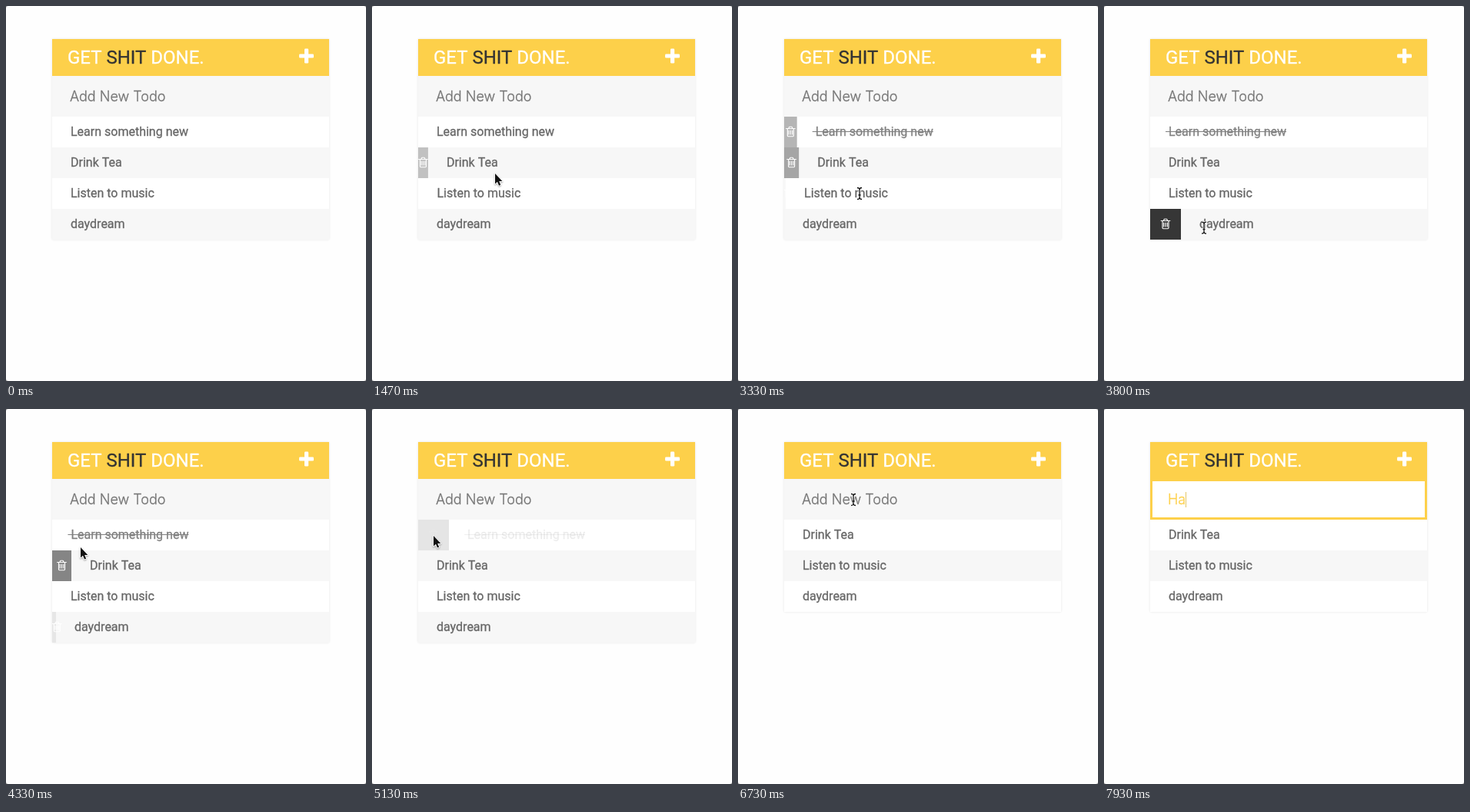
These frames come from a looping animation (468x488 px, 8000 ms). An HTML page with a canvas:

```html
<!DOCTYPE html>
<html lang="en">
<head>
<meta charset="utf-8">
<title>Todo list</title>
<style>
html, body { margin: 0; width: 100%; height: 100%; overflow: hidden; background: #fefefe; }
canvas { display: block; width: 468px; height: 488px; }
</style>
</head>
<body>
<canvas id="stage" width="468" height="488"></canvas>
<script>
const ctx = document.getElementById('stage').getContext('2d');
const FRAMES = 120, STEP = 200 / 3, SUBSTEPS = 32;
const LEFT = 60, WIDTH = 360, TOP = 43, INPUT_Y = 91, LIST_Y = 144, ROW = 40;
const BOX = 40, BOX_TIME = 200, ICON = 12.57;
const YELLOW = '#fdd04a', GRAY = '#f7f7f7', WHITE = '#fefefe';
const ITEM_FONT = '16px Roboto, sans-serif';
const TITLE_FONT = '24px Roboto, sans-serif';
const INPUT_FONT = '300 18px Inter, sans-serif';

const STRIKE = 2730, FADE = 4750, REMOVE = 5260, FOCUS = 6860;
const KEYS = [7460, 7660];
const items = ['Learn something new', 'Drink Tea', 'Listen to music', 'daydream'];

// Pointer stops as [time, x, y].
const path = [
  [60, 460, 438], [870, 190, 336], [1265, 165, 304], [1402, 162, 224], [1467, 160, 218],
  [1780, 160, 184], [1950, 163, 170], [3100, 163, 170], [3215, 161, 184], [3322, 158, 224],
  [3333, 158, 244], [3600, 150, 264], [3900, 120, 301], [4158, 102, 264], [4203, 100, 224],
  [4330, 97, 184], [4333, 97, 180], [4600, 80, 165], [5300, 80, 165], [5680, 92, 184],
  [5780, 102, 224], [5933, 107, 237], [6100, 108, 230], [6270, 135, 144], [6650, 150, 118]
];

const trash = new Path2D('M192 448H1600M448 448V1460Q448 1600 544 1600H1248Q1344 1600 1344 1460V448' +
  'M610 448L680 240Q700 192 740 192H1052Q1092 192 1112 240L1182 448' +
  'M640 704V1344M896 704V1344M1152 704V1344');
const arrow = new Path2D('M0 0V13.5L3 10.8L5 15.6L7.2 14.7L5.2 10H9.4Z');
const beam = new Path2D('M-3 -7.5Q0 -7.5 0 -5Q0 -7.5 3 -7.5M0 -5V5M-3 7.5Q0 7.5 0 5Q0 7.5 3 7.5M-1.5 2H1.5');

const clamp = (v, low, high) => Math.min(high, Math.max(low, v));
const listAt = t => t < REMOVE ? items : items.slice(1);

function pointerAt(t) {
  const k = path.findIndex(p => p[0] > t);
  if (k < 1) return path.at(k).slice(1);
  const [t0, x0, y0] = path[k - 1], [t1, x1, y1] = path[k];
  const p = (t - t0) / (t1 - t0);
  return [x0 + (x1 - x0) * p, y0 + (y1 - y0) * p];
}

// Delete boxes open under the pointer and close again at constant speed.
function simulateBoxes() {
  const widths = Object.fromEntries(items.map(item => [item, 0]));
  const frames = [], dt = STEP / SUBSTEPS;
  for (let n = 0; n < FRAMES * SUBSTEPS; n++) {
    if (n % SUBSTEPS === 0) frames.push({ ...widths });
    const [x, y] = pointerAt(n * dt);
    const inside = x >= LEFT && x < LEFT + WIDTH;
    listAt(n * dt).forEach((item, i) => {
      const hover = inside && Math.floor((y - LIST_Y) / ROW) === i;
      widths[item] = clamp(widths[item] + (hover ? 1 : -1) * dt * BOX / BOX_TIME, 0, BOX);
    });
  }
  return frames;
}

function rect(x, y, w, h, color) {
  ctx.fillStyle = color;
  ctx.fillRect(x, y, w, h);
}

function roundRect(x, y, w, h, r, color) {
  ctx.fillStyle = color;
  ctx.beginPath();
  ctx.roundRect(x, y, w, h, r);
  ctx.fill();
}

// A hairline stroke gives the text its slightly heavy smoothing.
function write(text, x, y, font, color) {
  ctx.font = font;
  ctx.fillStyle = ctx.strokeStyle = color;
  ctx.lineWidth = 0.3;
  ctx.lineJoin = 'round';
  ctx.fillText(text, x, y);
  ctx.strokeText(text, x, y);
  return x + ctx.measureText(text).width;
}

function drawHeader() {
  rect(LEFT, TOP, WIDTH, INPUT_Y - TOP, YELLOW);
  let x = write('GET ', 80, 75, TITLE_FONT, '#fff');
  x = write('SHIT', x, 75, TITLE_FONT, '#333');
  write(' DONE.', x, 75, TITLE_FONT, '#fff');
  roundRect(381.1, 62.4, 18.9, 5.2, 1.3, '#fff');
  roundRect(388, 55.6, 5.2, 18.9, 1.3, '#fff');
}

function drawInput(t) {
  const focused = t >= FOCUS;
  rect(LEFT, INPUT_Y, WIDTH, LIST_Y - INPUT_Y, focused ? YELLOW : GRAY);
  if (focused) rect(LEFT + 3, INPUT_Y + 3, WIDTH - 6, 47, '#fff');
  const typed = 'Ha'.slice(0, KEYS.filter(k => t >= k).length);
  let end = 83;
  if (typed) end = write(typed, 83, 124, INPUT_FONT, YELLOW);
  else write('Add New Todo', 83, 124, INPUT_FONT, '#757575');
  const last = [FOCUS, ...KEYS].filter(k => t >= k).pop();
  if (focused && (t - last) % 1000 < 500) rect(Math.round(end), 108, 1, 20, '#e6c666');
}

function drawBox(y, w) {
  ctx.save();
  const alpha = ctx.globalAlpha;
  ctx.globalAlpha = alpha * (w / BOX) ** 1.15;
  rect(LEFT, y, w, ROW, '#363636');
  ctx.globalAlpha = alpha;
  ctx.translate(LEFT + Math.max(0, (w - ICON) / 2), y + 19.5);
  ctx.scale(1 / 112, 1 / 112);
  ctx.translate(-192, -896);
  ctx.strokeStyle = '#fff';
  ctx.lineWidth = 128;
  ctx.stroke(trash);
  ctx.restore();
}

function drawRow(item, i, w, t) {
  const y = LIST_Y + i * ROW;
  const first = item === items[0], struck = first && t >= STRIKE;
  rect(LEFT, y, WIDTH, ROW, i % 2 ? GRAY : '#fff');
  ctx.save();
  if (first) {
    const p = clamp((t - FADE) / 500, 0, 1);
    ctx.globalAlpha = 0.5 + Math.cos(p * Math.PI) / 2;
  }
  if (w > 0) drawBox(y, w);
  const start = 84 + w;
  const end = write(item, start, y + 25, ITEM_FONT, struck ? '#808080' : '#666');
  if (struck) rect(start - 4, y + 19, end - start + 4, 1, '#808080');
  ctx.restore();
  return { y, start, end };
}

function drawPointer(t, rows) {
  if (t < path[0][0] || t >= KEYS[0]) return;
  const [x, y] = pointerAt(t);
  const overText = rows.some(r => x >= r.start && x <= r.end && Math.abs(y - r.y - 20) <= 10);
  const overInput = y > INPUT_Y && y < LIST_Y;
  ctx.save();
  ctx.translate(x, y);
  ctx.lineJoin = 'round';
  ctx.strokeStyle = '#fff';
  if (overText || overInput) {
    ctx.lineWidth = 3;
    ctx.stroke(beam);
    ctx.strokeStyle = '#111';
    ctx.lineWidth = 1.3;
    ctx.stroke(beam);
  } else {
    ctx.shadowColor = 'rgba(0,0,0,.35)';
    ctx.shadowBlur = 2;
    ctx.shadowOffsetY = 1;
    ctx.lineWidth = 1.8;
    ctx.stroke(arrow);
    ctx.shadowColor = 'transparent';
    ctx.fillStyle = '#111';
    ctx.fill(arrow);
  }
  ctx.restore();
}

function draw(frame) {
  const t = frame * STEP, list = listAt(t), widths = boxes[frame];
  rect(0, 0, 468, 488, '#8c8c8c');
  roundRect(0, 0, 468, 488, 3, WHITE);
  ctx.save();
  ctx.shadowColor = 'rgba(0,0,0,.1)';
  ctx.shadowBlur = 3;
  rect(LEFT, TOP, WIDTH, LIST_Y - TOP + list.length * ROW, '#fff');
  ctx.restore();
  drawHeader();
  drawInput(t);
  drawPointer(t, list.map((item, i) => drawRow(item, i, widths[item], t)));
}

const boxes = simulateBoxes();
const begin = performance.now();
function tick() {
  const t = performance.now() - begin;
  draw(Math.floor((t + 4) / STEP) % FRAMES);
  requestAnimationFrame(tick);
}
tick();
</script>
</body>
</html>
```
